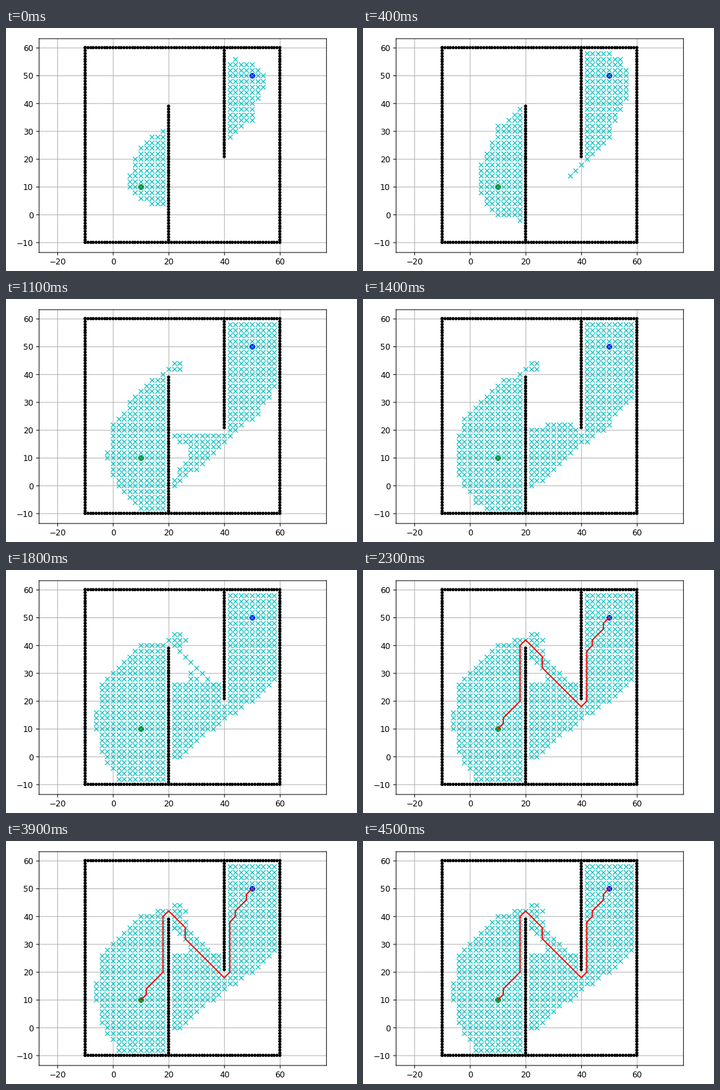
A matplotlib script for the animation above (4.6 s loop, 533 px wide and 369 px high).

```python
import math

import matplotlib.pyplot as plt
import numpy as np
from matplotlib.animation import FuncAnimation
from matplotlib.collections import LineCollection, PatchCollection
from matplotlib.patches import Circle

W, H, DPI = 533, 369, 88
FRAMES, INTERVAL = 46, 100
PATH_FRAME = 21

# The plot is laid out in pixels of a 640 x 480 canvas, shown at SCALE.
SCALE = 0.88
ORIGIN = np.array([-20.64, -35.31])
LEFT, RIGHT, TOP, BOTTOM = 80.5, 576.5, 58.5, 427.5
UNIT = 4.8
CENTRE = np.array([328, 242.4])

LOW, STEP, CELLS = -10, 2, 35
START, GOAL = (10, 10), (50, 50)
ROUTE = [(10, 10), (12, 12), (12, 14), (18, 20), (18, 40), (20, 42),
         (26, 36), (26, 32), (40, 18), (42, 20), (42, 38), (44, 40),
         (44, 42), (48, 46), (48, 48), (50, 50)]

DIAG = math.sqrt(2)
MOVES = [(1, 0, 1), (0, 1, 1), (-1, 0, 1), (0, -1, 1),
         (-1, -1, DIAG), (-1, 1, DIAG), (1, -1, DIAG), (1, 1, DIAG)]


def build_walls():
    pts = [(i, -10) for i in range(-10, 60)]
    pts += [(60, i) for i in range(-10, 60)]
    pts += [(i, 60) for i in range(-10, 61)]
    pts += [(-10, i) for i in range(-10, 61)]
    pts += [(20, i) for i in range(-10, 40)]
    pts += [(40, 60 - i) for i in range(40)]
    return np.array(pts)


def free_cells(walls, radius=1):
    cells = set()
    for ix in range(CELLS):
        for iy in range(CELLS):
            gap = walls - (LOW + ix * STEP, LOW + iy * STEP)
            if (gap ** 2).sum(axis=1).min() > radius ** 2:
                cells.add((ix, iy))
    return cells


def to_cell(point):
    return tuple((v - LOW) // STEP for v in point)


def cheapest(front, target):
    return min(front, key=lambda c: front[c] + math.hypot(
        target[0] - c[0], target[1] - c[1]))


def expand(cell, front, done, free):
    cost = front.pop(cell)
    done.add(cell)
    for dx, dy, length in MOVES:
        nxt = cell[0] + dx, cell[1] + dy
        if nxt not in free or nxt in done:
            continue
        if nxt not in front or front[nxt] > cost + length:
            front[nxt] = cost + length


def search(free):
    """Bidirectional A*: the pair of cells visited in each iteration."""
    a, b = to_cell(START), to_cell(GOAL)
    front_a, front_b = {a: 0.0}, {b: 0.0}
    done_a, done_b = set(), set()
    trail = []
    while front_a and front_b:
        a = cheapest(front_a, b)
        b = cheapest(front_b, a)
        trail.append((a, b))
        if a == b:
            break
        expand(a, front_a, done_a, free)
        expand(b, front_b, done_b, free)
    return np.array(trail) * STEP + LOW


def canvas(points):
    return CENTRE + (np.array(points) - 25) * (UNIT, -UNIT)


def snap(points):
    return np.floor(canvas(points) + 0.5)


def strokes(segments, color, width, **kw):
    lines = LineCollection(segments, colors=color, linewidths=width,
                           capstyle="butt", snap=False, **kw)
    return ax.add_collection(lines, autolim=False)


def dots(points, radius, color):
    discs = [Circle(p, radius) for p in snap(points)]
    ax.add_collection(PatchCollection(discs, color=color, linewidth=0,
                                      zorder=2), autolim=False)


def crosses(points, half=4):
    mid = snap(points) + 0.5
    arms = np.array([[(-half, -half), (half, half)],
                     [(-half, half), (half, -half)]])
    return (mid[:, None, None] + arms).reshape(-1, 2, 2)


walls = build_walls()
trail = search(free_cells(walls))

# The tiny surplus keeps the pixel size from being truncated.
fig = plt.figure(figsize=((W + 1e-3) / DPI, (H + 1e-3) / DPI), dpi=DPI)
x0, y0 = ORIGIN + np.array([LEFT, BOTTOM]) * SCALE
ax = fig.add_axes([x0 / W, 1 - y0 / H, (RIGHT - LEFT) * SCALE / W,
                   (BOTTOM - TOP) * SCALE / H])
ax.set_xlim(LEFT, RIGHT)
ax.set_ylim(BOTTOM, TOP)

x_ticks, y_ticks = range(-20, 61, 20), range(-10, 61, 10)
x_pos = [snap((t, 0))[0] + 0.5 for t in x_ticks]
y_pos = [snap((0, t))[1] + 0.5 for t in y_ticks]
ax.set_xticks(x_pos, [str(t).replace("-", "\u2212") for t in x_ticks])
ax.set_yticks(y_pos, [str(t).replace("-", "\u2212") for t in y_ticks])
ax.tick_params(length=0, pad=7)
ax.grid(True)
for line in ax.get_xgridlines() + ax.get_ygridlines():
    line.set_snap(False)
for spine in ax.spines.values():
    spine.set_snap(False)
strokes([[(x, BOTTOM), (x, BOTTOM + 5)] for x in x_pos]
        + [[(LEFT, y), (LEFT - 5, y)] for y in y_pos],
        "k", 0.8, clip_on=False)

dots(walls, 2.78, "k")
dots([START], 4.86, "g")
dots([GOAL], 4.86, "b")
marks = strokes([], "c", 1)
route, = ax.plot(*canvas(ROUTE).T, "-r")


def draw(k):
    found = k >= PATH_FRAME
    batches = 7 + int(k * 7 / 6 + 0.9)
    seen = trail if found else trail[:10 * batches + 1]
    marks.set_segments(crosses(seen.reshape(-1, 2)))
    route.set_visible(found)
    return marks, route


anim = FuncAnimation(fig, draw, frames=FRAMES, interval=INTERVAL,
                     repeat=True, repeat_delay=0)
plt.show()
```
